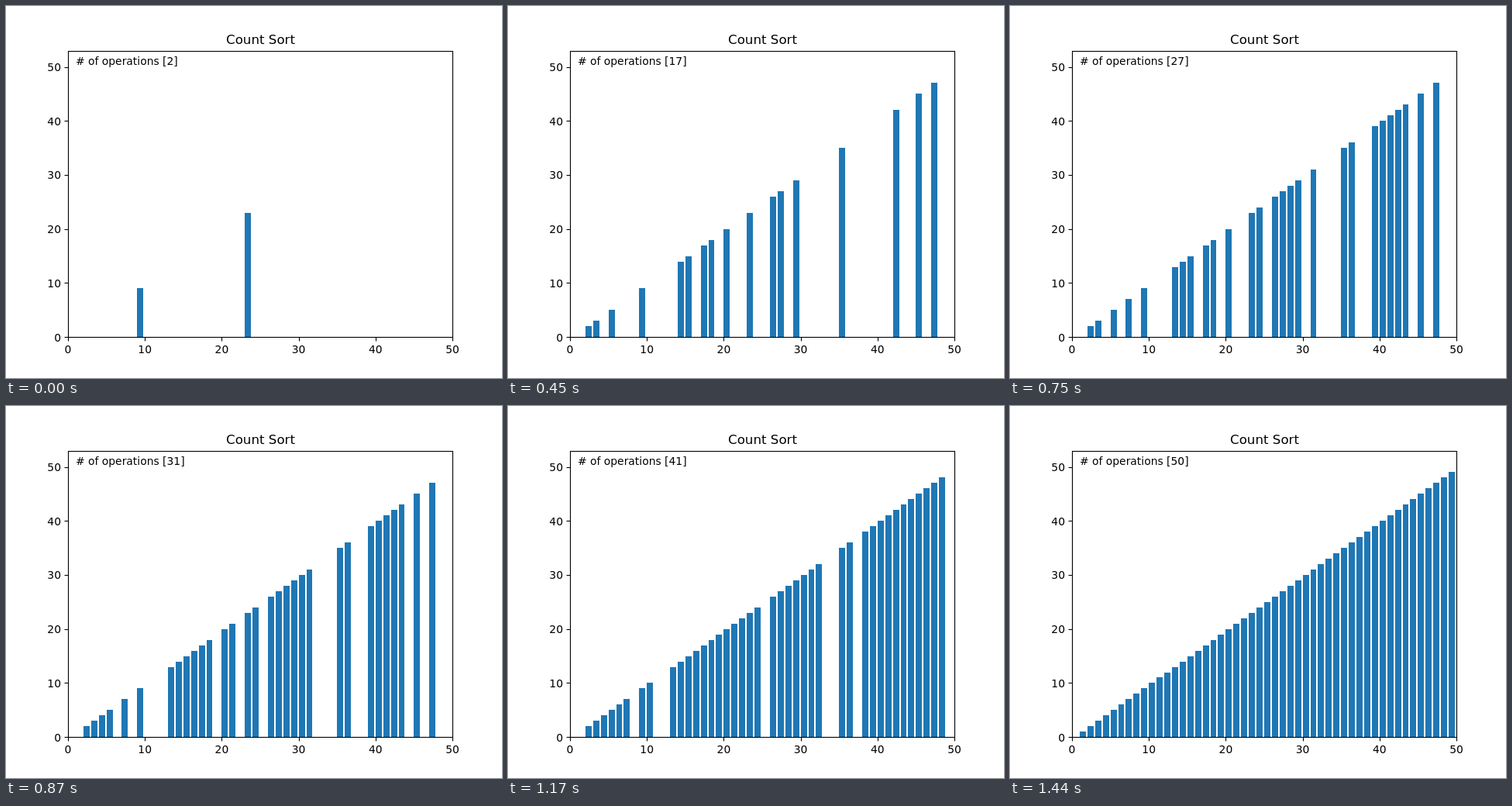
These frames come from a looping animation (640 by 480 pixels, 1.47 s). An HTML page with a canvas:

```html
<!DOCTYPE html>
<html lang="en">
<head>
<meta charset="utf-8">
<title>Count Sort</title>
<style>
  html, body { margin: 0; width: 640px; height: 480px; overflow: hidden; background: #fff; }
  canvas { display: block; }
</style>
</head>
<body>
<canvas width="640" height="480"></canvas>
<script>
const ctx = document.querySelector('canvas').getContext('2d');
const STEP = 30;
const LEFT = 80, RIGHT = 576, TOP = 57.6, BOTTOM = 427.2;

// Values in the order they are placed; each one lands at its own index.
const order = [
  9, 23, 42, 5, 27, 18, 35, 2, 26, 17,
  45, 14, 29, 3, 47, 20, 15,
  36, 7, 40, 28, 13, 43, 24, 39, 31, 41,
  16, 4, 30, 21, 38, 0, 10, 19, 6,
  48, 22, 44, 32, 46,
  12, 34, 1, 25, 49, 8, 37, 11, 33
];

const xAt = v => LEFT + v * (RIGHT - LEFT) / 50;
const yAt = v => BOTTOM - v * (BOTTOM - TOP) / 53;
const crisp = v => Math.round(v) + 0.5;

function text(string, x, y, align, size = 13.889) {
  ctx.font = `${size}px "DejaVu Sans", sans-serif`;
  ctx.textAlign = align;
  ctx.fillText(string, x, y);
}

function line(x1, y1, x2, y2) {
  ctx.beginPath();
  ctx.moveTo(x1, y1);
  ctx.lineTo(x2, y2);
  ctx.stroke();
}

function drawBar(value) {
  const x = Math.round(xAt(value)), y = Math.round(yAt(value));
  ctx.fillRect(x, y, Math.round(xAt(value + 0.8)) - x, Math.round(BOTTOM) - y);
}

function drawAxes() {
  const left = crisp(LEFT), bottom = crisp(BOTTOM);
  ctx.lineWidth = 1.11;
  ctx.strokeRect(left, crisp(TOP), crisp(RIGHT) - left, bottom - crisp(TOP));
  for (let v = 0; v <= 50; v += 10) {
    const x = crisp(xAt(v)), y = crisp(yAt(v));
    line(x, bottom, x, bottom + 5);
    line(left - 5, y, left, y);
    text(v, xAt(v), 448, 'center');
    text(v, 71, Math.round(yAt(v) + 5.5), 'right');
  }
}

function draw(now) {
  const count = 2 + Math.floor(now / STEP) % (order.length - 1);
  ctx.clearRect(0, 0, 640, 480);
  ctx.fillStyle = '#1f77b4';
  order.slice(0, count).forEach(drawBar);
  ctx.fillStyle = ctx.strokeStyle = '#000';
  drawAxes();
  text('Count Sort', 328.5, 49, 'center', 16.667);
  text(`# of operations [${count}]`, 90, 76, 'left');
}

let start;
function tick(now) {
  start ??= now;
  draw(now - start);
  requestAnimationFrame(tick);
}
draw(0);
requestAnimationFrame(tick);
</script>
</body>
</html>
```
